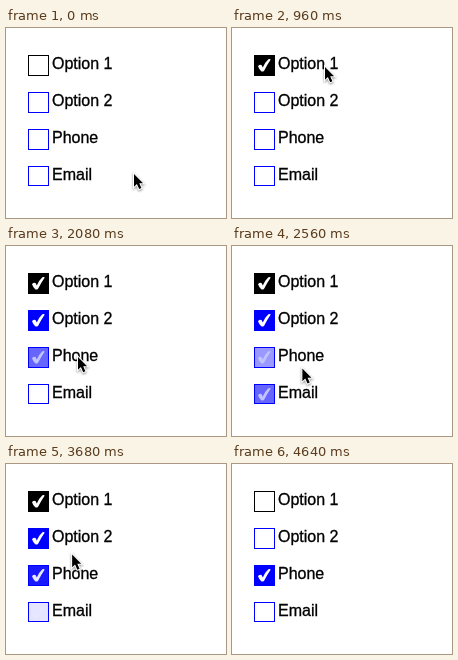
An HTML page for the animation above (4960 ms loop, 220 px wide and 190 px high).

```html
<!DOCTYPE html>
<html lang="en">
<head>
<meta charset="utf-8">
<title>Checkboxes</title>
<style>
  html, body { margin: 0; width: 100%; height: 100%; overflow: hidden; background: #fff; }
  svg { display: block; }
  text { font: 16px "Liberation Sans", Arial, sans-serif; stroke: #000; stroke-width: .3px; }
  #cursor { filter: drop-shadow(0 1.5px 1.2px rgba(0, 0, 0, .45)); }
</style>
</head>
<body>
<svg width="220" height="190" viewBox="0 0 220 190">
  <g id="rows"></g>
  <path id="cursor" d="M0 0V12.8L2.9 10.1 5.2 15.2 7.4 14.2 5.2 9.3H9.1Z"
    stroke="#fff" stroke-width="2" paint-order="stroke"/>
</svg>
<script>
const STEP = 160, LOOP = 4960, EXIT = 4640;
const FADE = 250, TRAVEL = 320;
const TICK = 'M26 38.2q1.7-2 3.7-1l1.1 2.2Q33 34.4 36.4 31.3q1.9-.9 2.2.4Q35 37 32.1 42.7q-1.6 1.6-3.1.2Q27 41 26 38.2Z';
const labels = ['Option 1', 'Option 2', 'Phone', 'Email'];

// Cursor stops: time, row, x. All but the first and last are clicks.
const stops = [
  [0, 2.97, 128], [480, 0, 93], [1500, 1, 75], [1930, 2, 72], [2410, 3, 69], [2650, 2, 71],
  [3215, 3, 64], [3455, 2, 65], [3825, 1, 67], [4170, 0, 70], [4480, 2.5, 173],
];
const clicks = stops.slice(1, -1);

const rows = document.getElementById('rows');
const cursor = document.getElementById('cursor');

// Box edges snap to whole pixels.
rows.innerHTML = labels.map((label, i) => {
  const edge = 27.4 + i * 36.8, top = Math.round(edge);
  const height = Math.round(edge + 20.6) - top;
  const color = i ? '#00f' : '#000';
  return `<g transform="translate(22 ${top})">
    <rect x=".5" y=".5" width="20" height="${height - 1}" fill="none" stroke="${color}"/>
    <g class="mark"><rect x="1" y="1" width="19" height="${height - 2}" fill="${color}"/>
      <path transform="translate(-22 -27)" d="${TICK}" fill="#fff"/></g>
    <text x="24" y="14">${label}</text>
  </g>`;
}).join('');
const marks = [...rows.querySelectorAll('.mark')].map(mark => [...mark.children]);

// The first two rows toggle; the last two exclude each other.
function levelAt(row, time) {
  let on = false, since = -FADE;
  for (const [at, clicked] of clicks) {
    if (at >= time) break;
    const next = row < 2 ? on !== (clicked === row) : clicked < 2 ? on : clicked === row;
    if (next !== on) [on, since] = [next, at];
  }
  const k = Math.min(1, (time - since) / FADE);
  return on ? k : 1 - k;
}

function cursorAt(time) {
  const next = Math.max(1, stops.findIndex(stop => stop[0] >= time));
  const [t0, row0, x0] = stops[next - 1], [t1, row1, x1] = stops[next];
  const span = Math.min(TRAVEL, t1 - t0);
  const u = Math.max(0, 1 - (t1 - time) / span);
  const k = u * u * (3 - 2 * u);
  return [x0 + (x1 - x0) * k, 39 + 36 * (row0 + (row1 - row0) * k)];
}

function draw(time) {
  marks.forEach((parts, i) => {
    for (const part of parts) part.style.opacity = levelAt(i, time);
  });
  const visible = time < EXIT;
  cursor.style.display = visible ? '' : 'none';
  if (visible) cursor.setAttribute('transform', `translate(${cursorAt(time)})`);
}

const start = performance.now();
function tick() {
  const time = Math.max(0, performance.now() - start) % LOOP;
  draw(Math.min(EXIT, Math.floor(time / STEP) * STEP));
  requestAnimationFrame(tick);
}
tick();
</script>
</body>
</html>
```
